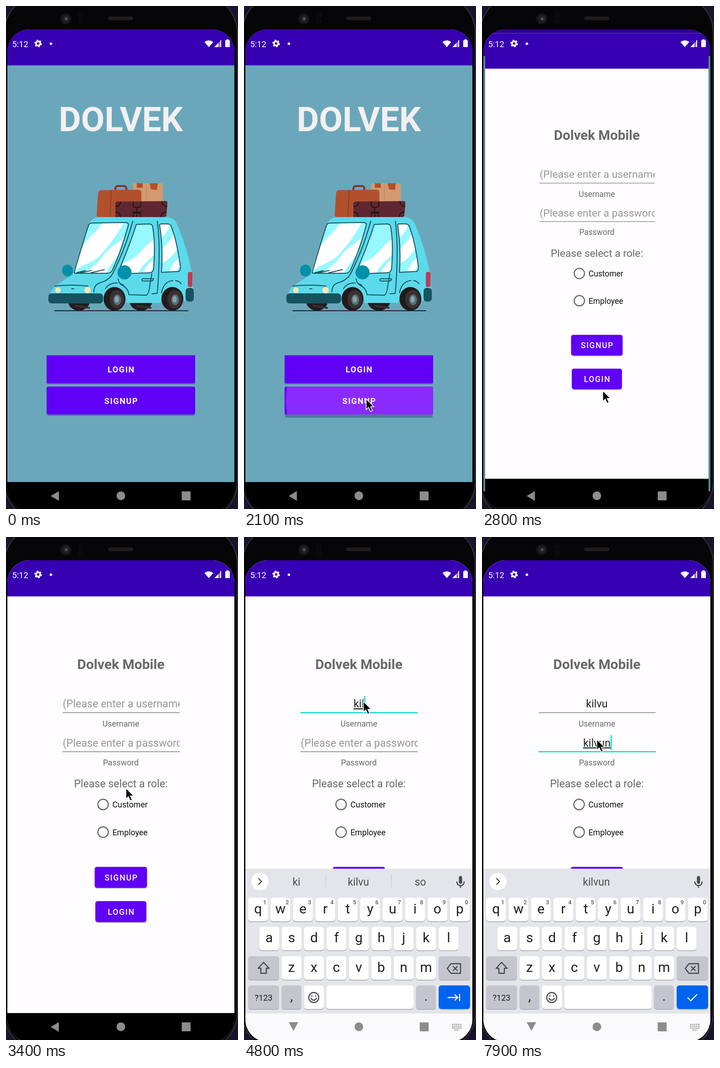
An HTML page that plays this animation: 509x1101 px, repeating every 8 s.

```html
<!DOCTYPE html>
<html lang="en">
<head>
<meta charset="utf-8">
<style>
html, body { margin: 0; width: 100%; height: 100%; overflow: hidden; background: #0b0910 }
svg { display: block; width: 509px; height: 1101px; font-family: Roboto, sans-serif }
.mid { text-anchor: middle }
.ink { fill: none; stroke: #16505c; stroke-width: 2; stroke-linecap: round; stroke-linejoin: round }
.glyph { fill: none; stroke: #46484c; stroke-width: 2.4; stroke-linecap: round; stroke-linejoin: round }
.strap { fill: none; stroke: #1d1418; stroke-width: 2 }
</style>
</head>
<body>
<svg viewBox="0 0 509 1101">
  <defs>
    <clipPath id="screen"><rect x="3" y="51" width="498" height="1054" rx="49"/></clipPath>
    <clipPath id="hintBox"><rect x="124" y="340" width="257" height="130"/></clipPath>
    <clipPath id="pressBox"><rect x="89" y="833" width="326" height="61" rx="4"/></clipPath>
    <path id="frontGlass" d="M150 582Q162 540 181 480Q183 475 190 475L262 474Q270 474 268 481Q252 538 234 577Q231 585 222 585H153Q149 585 150 582Z"/>
    <path id="midGlass" d="M286 478Q269 530 249 575Q247 586 257 586L315 584Q323 584 324 572Q328 520 322 484Q321 477 314 477Z"/>
    <path id="rearGlass" d="M337 479Q345 530 341 583L378 581Q384 580 382 566Q374 510 362 481Q360 477 354 477H339Z"/>
    <clipPath id="frontClip"><use href="#frontGlass"/></clipPath>
    <clipPath id="midClip"><use href="#midGlass"/></clipPath>
    <clipPath id="rearClip"><use href="#rearGlass"/></clipPath>
    <g id="tyre">
      <ellipse rx="24" ry="26" fill="#211b1e"/>
      <ellipse cx="5" cy="1" rx="16" ry="20" fill="#3b3033"/>
      <ellipse cx="6" cy="2" rx="8.500" ry="11.500" fill="#56737a"/>
      <ellipse cx="5" cy="1" rx="4.500" ry="7" fill="#8ba3a8"/>
    </g>
  </defs>

  <!-- phone body -->
  <rect width="509" height="1101" fill="#19142b"/>
  <rect x="-4" y="-25" width="511.500" height="1150" rx="84" fill="#060507" stroke="#38353d" stroke-width="2"/>
  <circle cx="131" cy="28" r="12" fill="#17171a"/>
  <circle cx="132" cy="28" r="7" fill="#25262b"/>
  <circle cx="132" cy="28" r="2.500" fill="#606267"/>
  <g fill="#080809" stroke="#18181a"><circle cx="164" cy="20" r="5"/><circle cx="164" cy="34" r="5"/></g>
  <rect x="224" y="23" width="55" height="8" rx="4" fill="#201d1e"/>

  <g clip-path="url(#screen)">
    <g id="welcome">
      <rect x="3" y="51" width="498" height="1056" fill="#6ba7ba"/>
      <rect x="3" y="51" width="498" height="79" fill="#3700b3"/>
      <rect x="3" y="1042" width="498" height="65"/>
      <text class="mid" x="252" y="274" font-size="75" font-weight="700" fill="#f2f0f2">DOLVEK</text>

      <!-- luggage -->
      <path d="M240 405Q239 394 245 394H259Q265 394 264 405" fill="none" stroke="#783728" stroke-width="4"/>
      <path d="M279 390Q279 388 282 388H341Q344 388 344 391V430H279Z" fill="#d29a6e"/>
      <path d="M287 388H300V398H287ZM315 388H333L331 403L318 401Z" fill="#b1502c"/>
      <path d="M308 390V428" stroke="#b9815a"/>
      <path d="M199 457L202 410Q203 403 210 403L290 402Q297 402 297 409V462H203Q199 462 199 457Z" fill="#b1502c"/>
      <path d="M231 404L228 462" stroke="#6b3023"/>
      <path d="M240 432Q240 428 245 428L350 427Q355 427 354 432L352 458Q351 462 347 462H240Z" fill="#5f2731"/>
      <path class="strap" d="M240 439Q251 439 251 428M342 427Q343 438 354 439M240 451Q250 451 251 462M352 451Q341 451 340 462M279 428V436Q279 441 287 441Q296 441 296 435V428M287 441V462M279 462V455Q287 449 295 455V462M276 451H298"/>

      <!-- car -->
      <ellipse cx="135" cy="579" rx="12" ry="13" fill="#0091a8"/>
      <g fill="#211b1e"><ellipse cx="160" cy="645" rx="24" ry="22"/><ellipse cx="296" cy="645" rx="25" ry="22"/></g>
      <path d="M151 656L184 661M286 656L319 661" stroke="#3b3033" stroke-width="4"/>
      <path d="M95 638Q98 619 112 610L146 588L180 481Q186 463 205 462H350Q368 462 375 477Q398 530 409 590L411 640L390 646Q386 620 368 620Q345 621 339 650H264Q262 617 241 617Q220 618 214 650H104Z" fill="#5bdaec"/>
      <g fill="#97f8ff"><use href="#frontGlass"/><use href="#midGlass"/><use href="#rearGlass"/></g>
      <g fill="#fff">
        <path clip-path="url(#frontClip)" d="M214 470C196 500 186 500 160 535L140 590C170 560 190 566 212 540S238 508 262 470ZM272 488C250 524 232 520 212 548S180 572 172 590H216C232 560 246 550 262 520Z"/>
        <path clip-path="url(#midClip)" d="M330 508C304 520 296 546 272 556S250 576 244 590H288C298 566 312 556 330 542ZM330 552Q308 562 298 590H330Z"/>
        <path clip-path="url(#rearClip)" d="M334 474H362Q356 496 338 510ZM370 496Q358 520 338 534V566Q366 552 380 524ZM384 546Q366 560 356 586H372Q376 574 388 564Z"/>
      </g>
      <g class="ink">
        <use href="#frontGlass"/><use href="#midGlass"/><use href="#rearGlass"/>
        <path d="M278 471Q262 530 236 582Q228 600 206 606Q192 611 193 626M246 597Q247 608 256 612Q268 618 270 632L308 633Q314 630 316 608L320 586M332 471Q340 530 332 629L320 630M300 597H322Q325 597 323 600Q321 602 316 602H300Q296 600 300 597ZM218 619Q226 606 244 606M250 607L258 611M341 628Q346 603 366 601M372 601Q380 602 384 608M107 613Q146 609 180 613M144 619H149M155 584L174 579M163 584L187 579M186 584L216 577"/>
      </g>
      <circle cx="260" cy="583" r="15.500" fill="#0091a8"/>
      <g fill="#f5e9ad"><ellipse cx="114" cy="622" rx="6" ry="6"/><ellipse cx="179" cy="622" rx="7" ry="7"/></g>
      <rect x="399" y="582" width="10" height="33" rx="4" fill="#bd3c52"/>
      <rect x="394" y="617" width="18" height="30" rx="7" fill="#17535e"/>
      <use href="#tyre" x="238" y="641"/><use href="#tyre" x="365" y="641"/>
      <rect x="93" y="629" width="120" height="22" rx="7" fill="#17535e"/>
      <path d="M107 667H399" stroke="#202022" stroke-width="2.200" stroke-linecap="round"/>

      <rect x="90" y="767" width="324" height="61" fill="#223a60" opacity=".4"/>
      <rect x="89" y="764.500" width="326" height="61" fill="#6000f7"/>
      <rect id="pressShade" x="90" y="836" width="324" height="61" rx="4" fill="#223a60" opacity=".4"/>
      <rect x="89" y="833" width="326" height="61" rx="4" fill="#6000f7"/>
      <g clip-path="url(#pressBox)"><circle id="ripple" cx="268" cy="863" fill="#8a2bfd"/></g>
      <g class="mid" font-size="18" font-weight="700" letter-spacing="1.600" fill="#fff">
        <text x="253" y="802">LOGIN</text><text x="253" y="870.500">SIGNUP</text>
      </g>
      <rect id="dim" x="3" y="51" width="498" height="1056" opacity="0"/>
    </g>

    <g id="form">
      <rect x="3" y="51" width="498" height="1056" fill="#fffdff"/>
      <rect x="3" y="51" width="498" height="79" fill="#3700b3"/>
      <rect x="3" y="1042" width="498" height="65"/>
      <g class="mid" fill="#68676b">
        <text x="252" y="288.500" font-size="30" font-weight="700">Dolvek Mobile</text>
        <g font-size="17.800"><text x="252" y="415">Username</text><text x="252" y="500">Password</text></g>
        <text x="252" y="548" font-size="23.200">Please select a role:</text>
      </g>
      <g font-size="23.300" fill="#98979a" clip-path="url(#hintBox)">
        <text id="hint0" x="124.500" y="373">(Please enter a username)</text>
        <text id="hint1" x="124.500" y="458.500">(Please enter a password)</text>
      </g>
      <path id="line0" d="M124 384.500H381"/><path id="line1" d="M124 470H381"/>
      <g class="mid" font-size="23.300" fill="#202022">
        <text id="value0" x="252" y="373"/><text id="value1" x="252" y="458.500"/>
      </g>
      <rect id="caret" width="2.600" height="33" fill="#0cd9c6"/>
      <g fill="none" stroke="#68676b" stroke-width="2.400"><circle cx="213" cy="585.500" r="11.500"/><circle cx="213" cy="646" r="11.500"/></g>
      <g font-size="17.800" fill="#111"><text x="233.500" y="592">Customer</text><text x="233.500" y="653">Employee</text></g>
      <g fill="#888" opacity=".45"><rect x="195" y="725" width="114" height="45" rx="5"/><rect x="197" y="800" width="111" height="45" rx="5"/></g>
      <g fill="#6000f7"><rect x="194.500" y="722" width="115" height="46" rx="5"/><rect x="196" y="797" width="112" height="46" rx="5"/></g>
      <g class="mid" font-size="17.800" font-weight="500" letter-spacing="1.700" fill="#fff">
        <text x="253" y="752">SIGNUP</text><text x="253" y="827">LOGIN</text>
      </g>
    </g>

    <g id="keyboard">
      <rect x="3" y="726" width="498" height="318" fill="#e4e5ea"/>
      <rect x="3" y="1043" width="498" height="64" fill="#fafafc"/>
      <circle cx="35" cy="754" r="19" fill="#fff"/>
      <g class="glyph">
        <path id="chevron"/>
        <path d="M467 755Q468 763 475 763Q482 763 483 755M475 763V767"/>
      </g>
      <rect x="471.500" y="742" width="7" height="17" rx="3.500" fill="#46484c"/>
      <g id="tools">
        <g class="glyph">
          <circle cx="98.500" cy="750.500" r="6.500"/><path d="M103.500 756L110 762.500"/>
          <path d="M165 744H179Q182 744 182 747V755L175 763H165Q162 763 162 760V747Q162 744 165 744ZM182 755H175V763M167 750V751M177 750V751M167 755Q170 758 173 756"/>
          <path d="M307 745H323V764H307ZM311 745V749H319V745M311 754H319M311 759H317"/>
          <path d="M359.500 739V767" style="stroke:#c4c5ca;stroke-width:1"/>
        </g>
        <text class="mid" x="242" y="759" font-size="16.500" font-weight="900" fill="#46484c">GIF</text>
        <g fill="#46484c"><circle cx="396" cy="754" r="2.400"/><circle cx="404" cy="754" r="2.400"/><circle cx="412" cy="754" r="2.400"/></g>
      </g>
      <g id="suggest" class="mid" font-size="23" fill="#4a4c50">
        <text id="guess" x="251" y="763"/>
        <g id="sides">
          <text x="115" y="763">ki</text><text x="387" y="763">so</text>
          <path d="M179.500 738V769M323.500 738V769" stroke="#c4c5ca"/>
        </g>
      </g>
      <g id="keys"></g>
      <g class="glyph">
        <path d="M43 931L55 944H49V955H37V944H31Z"/>
        <path d="M454 934H475V955H454L446 944.500ZM459 940L468 949M468 940L459 949"/>
        <circle cx="153" cy="1008" r="11"/><path d="M149 1004V1005M157 1004V1005M147 1010Q153 1018 159 1010"/>
      </g>
      <path id="action" fill="none" stroke="#fff" stroke-width="2.300"/>
    </g>

    <!-- system bars -->
    <g fill="#8c8c8e">
      <path id="back"/>
      <circle cx="252" cy="1072" r="9.500"/><rect x="385.500" y="1062.500" width="19.500" height="19.500" rx="1"/>
    </g>
    <path id="switcher" d="M457 1067H477M457 1071H477M457 1075H477M462 1079H472" stroke="#8c8c8e" stroke-width="2.400" stroke-dasharray="2.400 2"/>
    <g fill="#fff">
      <text x="13.500" y="89.500" font-size="18.300">5:12</text>
      <circle cx="70.500" cy="82" r="4.600" fill="none" stroke="#fff" stroke-width="3.600"/>
      <circle cx="70.500" cy="82" r="7" fill="none" stroke="#fff" stroke-width="2.600" stroke-dasharray="3.700 3.630"/>
      <circle cx="98.500" cy="82.500" r="2.800"/>
      <path d="M435.500 79Q445 71.500 454.500 79L445 90Z"/>
      <path d="M472 75V90H457Z" opacity=".45"/><path d="M466 81V90H457ZM470 75.500L472 74V90H470Z"/>
      <path d="M483.500 75V73H488.500V75H490Q491 75 491 76V89Q491 90 490 90H482Q481 90 481 89V76Q481 75 482 75Z"/>
    </g>
  </g>
  <path id="pointer" d="M0 0V23.500L5.300 18.500L9.500 27.500L13.600 25.600L9.600 17H17Z" stroke="#fff" stroke-width="1.500"/>
</svg>
<script>
const LOOP = 8000, WORD = 'kilvun';
const NAME_KEYS = [4500, 4600, 4700, 4900, 5000];
const PASS_KEYS = [6200, 6300, 6500, 6900, 7300, 7800];
const FOCUS = [3900, 5800];
const OPEN = 2655;
const el = id => document.getElementById(id);
const set = (id, attrs) => { for (const k in attrs) el(id).setAttribute(k, attrs[k]); };
const show = (id, on) => set(id, { display: on ? 'inline' : 'none' });
const clamp = v => Math.max(0, Math.min(1, v));
const out = (p, power) => 1 - (1 - clamp(p)) ** power;
const smooth = p => p * p * (3 - 2 * p);
const zoom = s => `translate(252 586) scale(${s}) translate(-252 -586)`;

// pointer stops: time, x, y
const ROUTE = [[300, 515, 1010], [1400, 268, 860], [2300, 268, 860], [2700, 265, 842],
  [3000, 265, 842], [3700, 262, 360], [5300, 262, 360], [5700, 252, 443]];

function key(x, y, w, label = '', fill = '#fff', size = 30) {
  return `<rect x="${x}" y="${y + 1.5}" width="${w}" height="52" rx="6" fill="#b4b5bb"/>
    <rect x="${x}" y="${y}" width="${w}" height="51.500" rx="6" fill="${fill}"/>
    <text class="mid" x="${x + w / 2}" y="${y + (size < 30 ? 33 : 34)}" font-size="${size}" fill="#1d1e20">${label}</text>`;
}

function buildKeys() {
  const grey = '#c5c6cd';
  let html = '';
  [['qwertyuiop', 9, 789.5], ['asdfghjkl', 33.5, 853], ['zxcvbnm', 82.5, 917.5]].forEach(([row, x0, y], r) =>
    [...row].forEach((c, i) => {
      const x = x0 + 49.2 * i;
      html += key(x, y, 43.5, c);
      if (!r) html += `<text class="mid" x="${x + 36.5}" y="804" font-size="12.500" font-weight="500" fill="#55575c">${(i + 1) % 10}</text>`;
    }));
  html += key(9, 917.5, 68, '', grey) + key(427, 917.5, 69, '', grey)
    + key(9, 981.5, 68, '?123', grey, 18) + key(82.5, 981.5, 43.5, ',', grey, 29)
    + key(131.5, 981.5, 43.5) + key(180.5, 981.5, 191.5)
    + key(377.5, 981.5, 43.5, '.', grey, 29) + key(427, 981.5, 69, '', '#0063f0');
  el('keys').innerHTML = html;
}

function pointerAt(t) {
  const i = ROUTE.findIndex(stop => stop[0] > t);
  if (i < 0) return ROUTE[ROUTE.length - 1].slice(1);
  if (!i) return [-60, -60];
  const [t0, x0, y0] = ROUTE[i - 1], [t1, x1, y1] = ROUTE[i];
  const p = smooth((t - t0) / (t1 - t0));
  return [x0 + (x1 - x0) * p, y0 + (y1 - y0) * p];
}

function drawWelcome(t, opened) {
  const pressed = t >= 1950 && t < 2600;
  set('ripple', { r: pressed ? 20 + (t - 1950) * 1.04 : 0, opacity: 1 - clamp((t - 2350) / 250) });
  set('pressShade', { y: pressed ? 840 : 836 });
  set('dim', { opacity: 0.2 * clamp((t - OPEN) / 100) });
  set('welcome', { transform: zoom(1 + 0.05 * opened) });
}

function drawForm(t, opened) {
  show('form', t >= OPEN + 30);
  set('form', { opacity: clamp((t - OPEN - 30) / 60), transform: zoom(0.85 + 0.15 * opened) });
  const active = t >= FOCUS[1] ? 1 : t >= FOCUS[0] ? 0 : -1;
  show('caret', false);
  [NAME_KEYS, PASS_KEYS].forEach((times, i) => {
    const typed = times.filter(k => k <= t), on = i === active;
    show('hint' + i, !typed.length);
    el('value' + i).textContent = WORD.slice(0, typed.length);
    set('value' + i, { 'text-decoration': on ? 'underline' : 'none' });
    set('line' + i, { stroke: on ? '#0cd9c6' : '#7d7c80', 'stroke-width': on ? 2.6 : 1.4 });
    if (!on) return;
    const last = typed.length ? typed[typed.length - 1] : FOCUS[i];
    const x = typed.length ? 252 + el('value' + i).getComputedTextLength() / 2 : 258.5;
    set('caret', { x, y: i ? 433.5 : 348 });
    show('caret', (t - last) % 1000 < 500);
  });
}

function drawKeyboard(t) {
  const typing = t >= NAME_KEYS[0] && t < FOCUS[1] || t >= PASS_KEYS[0];
  const settled = t >= 4200;
  show('keyboard', t >= 3950);
  set('keyboard', { transform: `translate(0 ${375 * (1 - out((t - 3950) / 330, 3))})` });
  show('tools', !typing);
  show('suggest', typing);
  show('sides', t < PASS_KEYS[3]);
  el('guess').textContent = t >= PASS_KEYS[5] ? WORD : WORD.slice(0, 5);
  set('chevron', { d: typing ? 'M32 747.500L38.500 754L32 760.500' : 'M38 747.500L31.500 754L38 760.500' });
  set('action', { d: t >= FOCUS[1] ? 'M451 1008L458 1015L472 1001' : 'M447 1008H468M462 1001.500L469 1008L462 1014.500M473 1000V1016' });
  set('back', { d: settled ? 'M98 1062H119L108.500 1081Z' : 'M98 1072.500L116 1062V1083Z' });
  show('switcher', settled);
}

function frame(now) {
  const t = Math.floor(now % LOOP / 100) * 100;
  const opened = out((t - OPEN) / 400, 5);
  drawWelcome(t, opened);
  drawForm(t, opened);
  drawKeyboard(t);
  set('pointer', { transform: `translate(${pointerAt(t)})` });
  requestAnimationFrame(frame);
}

buildKeys();
requestAnimationFrame(frame);
</script>
</body>
</html>
```
